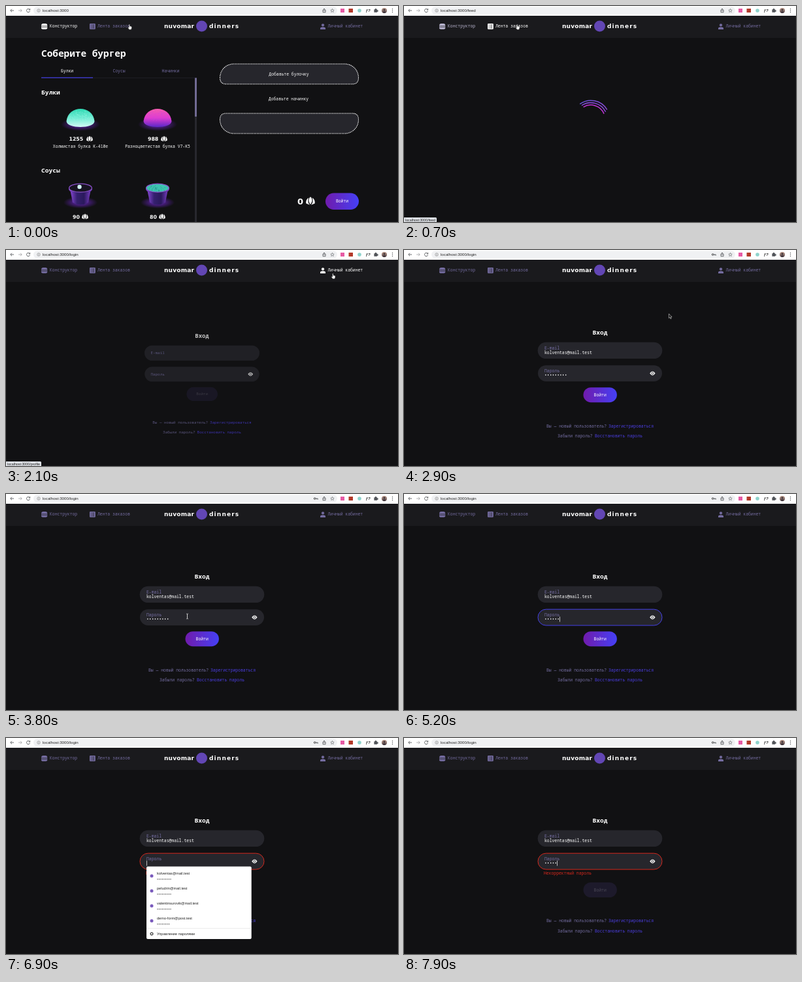
Write an HTML page that moves like this. It is 600x332 px and loops after 8000 ms.

```html
<!DOCTYPE html>
<html lang="ru">
<head>
<meta charset="utf-8">
<title>Конструктор бургеров</title>
<style>
  html, body { margin: 0; width: 100%; height: 100%; overflow: hidden; background: #111113; }
  svg { display: block; width: 600px; height: 332px; }
  text { font: 500 6.4px "Noto Sans Mono", "DejaVu Sans Mono", monospace; fill: #fff; white-space: pre; }
  .ui { font-family: "Liberation Sans", Arial, sans-serif; font-weight: 400; fill: #222; }
  .num { font: bold 7.8px "DejaVu Sans", sans-serif; }
  .brand { font: bold 9px "DejaVu Sans", sans-serif; }
  .mid { text-anchor: middle; }
  .h1 { font-size: 14.4px; font-weight: 600; }
  .h2 { font-size: 9.6px; font-weight: 600; }
  .dim { fill: #746da2; }
  .link { fill: #4b3ee0; }
  .line { fill: none; stroke: #55585c; stroke-width: .9; }
</style>
</head>
<body>
<svg id="stage" viewBox="0 0 600 332"></svg>
<script>
const LOOP = 8000;
const CHAR = 3.84;
const INPUT = '#26262c';

const text = (x, y, str, cls = '', extra = '') =>
  `<text x="${x}" y="${y}" class="${cls}" ${extra}>${str}</text>`;
const rect = (x, y, w, h, fill, r = 0, extra = '') =>
  `<rect x="${x}" y="${y}" width="${w}" height="${h}" rx="${r}" fill="${fill}" ${extra}/>`;
const circle = (x, y, r, fill, extra = '') =>
  `<circle cx="${x}" cy="${y}" r="${r}" fill="${fill}" ${extra}/>`;
const ellipse = (x, y, rx, ry, fill, extra = '') =>
  `<ellipse cx="${x}" cy="${y}" rx="${rx}" ry="${ry}" fill="${fill}" ${extra}/>`;
const path = (d, fill, extra = '') => `<path d="${d}" fill="${fill}" ${extra}/>`;
const line = d => `<path class="line" d="${d}"/>`;
const group = (id, body, extra = '') => `<g id="${id}" ${extra}>${body}</g>`;

let seed = 7;
const random = () => (seed = seed * 16807 % 2147483647) / 2147483647;

function speckles(cx, cy, rx, ry, color, count, arc = Math.PI) {
  let out = '';
  for (let i = 0; i < count; i++) {
    const a = Math.PI + arc * random(), d = Math.sqrt(random());
    const x = cx + Math.cos(a) * rx * d, y = cy + Math.sin(a) * ry * d;
    out += circle(x.toFixed(1), y.toFixed(1), .45, color);
  }
  return out;
}

const gradient = (id, colors, dir = '') => `<linearGradient id="${id}" ${dir}>`
  + colors.map((c, i) => `<stop offset="${i / (colors.length - 1)}" stop-color="${c}"/>`).join('') + '</linearGradient>';
const down = 'x1="0" y1="0" x2="0" y2="1"';

const defs = `<defs>
  ${gradient('action', ['#701bac', '#4540f5'])}
  ${gradient('mint', ['#2fd9b3', '#6fecd3', '#d3faf5'], down)}
  ${gradient('berry', ['#f45cb0', '#e03cd0', '#5a28c8'], down)}
  ${gradient('pot', ['#8a48d8', '#35206f', '#2a195c', '#7a3fc4'])}
  ${gradient('arc', ['#6558d8', '#8a48d6'])}
  ${gradient('face', ['#bd9a8a', '#59494e'], down)}
  <radialGradient id="glow"><stop stop-color="#6b24c5"/><stop offset="1" stop-color="#6b24c5" stop-opacity="0"/></radialGradient>
</defs>`;

const toolbar = rect(0, 0, 600, 15, '#fff') + rect(42, 1.5, 465, 11, '#f0f1f3', 5.5)
  + line('M12 7H7M9 4.7L6.7 7L9 9.3')
  + `<g opacity=".5">${line('M19 7H24M22 4.7L24.3 7L22 9.3')}</g>`
  + line('M36.2 5.5A2.6 2.6 0 1 0 36.6 7.6M36.7 4V6H34.7')
  + `<g opacity=".8">${circle(50, 7, 2.3, 'none', 'stroke="#666" stroke-width=".6"')}${line('M50 6.7V8.2M50 5.4V5.9')}</g>`
  + text(56, 9.2, 'localhost:3000', 'ui', 'id="url" style="font-size:6.2px"')
  + group('key', circle(472.6, 7, 1.3, 'none', 'stroke="#444" stroke-width="1"') + line('M474 7H477.3V8.5M475.7 7V8.3'))
  + line('M486 6H485V9.7H489V6H488M487 8V4M485.8 5.2L487 4L488.2 5.2')
  + path('M499.5 4.3L500.3 6.1L502.2 6.3L500.8 7.6L501.2 9.5L499.5 8.5L497.8 9.5L498.2 7.6L496.8 6.3L498.7 6.1Z', 'none', 'stroke="#55585c" stroke-width=".6"')
  + rect(512, 4, 6, 6, '#e65ba5') + rect(524.5, 4, 6.5, 6, '#b33a2a') + circle(541, 7, 2.8, '#8ed3cc')
  + text(550.5, 9.2, 'ƒ?', 'ui', 'style="font-style:italic;font-weight:bold;font-size:6.2px"')
  + path('M563.4 5.2H565A1.1 1.1 0 1 1 567 5.2H568.2V6.5A1.1 1.1 0 1 1 568.2 8.5V9.8H563.4Z', '#505358')
  + circle(579, 7, 4, 'url(#face)') + circle(579, 6, 1.4, '#40363c') + path('M576.3 9.6Q579 6.3 581.7 9.6Q579 12.2 576.3 9.6', '#40363c')
  + [4.5, 7, 9.5].map(y => circle(591.5, y, .7, '#55585c')).join('');

const header = rect(0, 15, 600, 34, '#1a1a1d')
  + group('navBuild', path('M54 30.4Q54 27 57 27H60.3Q63.3 27 63.3 30.4Z', 'inherit')
      + rect(54, 31.1, 9.3, 1.3, 'inherit') + path('M54 33H63.3V34Q63 35.7 61 35.7H56.3Q54 35.7 54 34Z', 'inherit')
      + text(67, 33.4, 'Конструктор', '', 'style="fill:inherit"'))
  + group('navFeed', rect(128, 27, 8.8, 8.8, 'inherit', 1)
      + path('M129.8 29.2H131M132 29.2H135M129.8 31.4H131M132 31.4H135M129.8 33.6H131M132 33.6H135', 'none', 'stroke="#1a1a1d" stroke-width=".8"')
      + text(140, 33.4, 'Лента заказов', '', 'style="fill:inherit"'))
  + group('navUser', circle(485, 29.3, 2.1, 'inherit') + path('M481 36V34.2Q481 32.2 485 32.2Q489 32.2 489 34.2V36Z', 'inherit')
      + text(492.5, 33.4, 'Личный кабинет', '', 'style="fill:inherit"'))
  + text(242, 33.6, 'nuvomar', 'brand', 'letter-spacing=".2"')
  + circle(299.5, 31, 8.5, '#6246b4')
  + text(311, 33.6, 'dinners', 'brand', 'letter-spacing="1.15"');

const gem = (x, y, s) => `<g transform="translate(${x} ${y}) scale(${s})" fill="#fff">
  <path d="M0-4.6C2.3-2.6 2.6.8 0 4C-2.6.8-2.3-2.6 0-4.6M-2-3.6C-4.2-2.4-5.4.2-4.9 3L-.8 4.6C-3 2.2-3.1-.8-2-3.6M2-3.6C4.2-2.4 5.4.2 4.9 3L.8 4.6C3 2.2 3.1-.8 2-3.6"/></g>`;

const bun = (x, fill, dots) => ellipse(x, 182, 30, 10, 'url(#glow)')
  + path(`M${x - 21.5} 177C${x - 19} 151.5 ${x + 19} 151.5 ${x + 21.5} 177C${x + 21.5} 189 ${x - 21.5} 189 ${x - 21.5} 177Z`, fill)
  + speckles(x, 176, 18, 16, dots, 90);

const pot = (x, sauce) => ellipse(x, 302, 26, 9, 'url(#glow)')
  + path(`M${x - 16} 281L${x - 12} 302Q${x} 309 ${x + 12} 302L${x + 16} 281Z`, 'url(#pot)')
  + ellipse(x, 281, 18, 7.5, 'url(#pot)') + ellipse(x, 279.7, 17.4, 6.5, sauce, 'stroke="#8a50c8" stroke-width="1.2"');

const price = (x, y, value, gemX) => text(x, y, value, 'num') + gem(gemX, y - 3, .95);

const button = (x, y, w, h, id, extra = '') => rect(x, y, w, h, 'url(#action)', h / 2, `id="${id}"`)
  + text(x + w / 2, y + h / 2 + 2.2, 'Войти', 'mid', extra);

const slot = d => path(d, INPUT, 'stroke="#fff" stroke-width="1.1" stroke-dasharray="1.5 1"');

const builder = text(54, 77.8, 'Соберите бургер', 'h1')
  + text(93.5, 101.7, 'Булки', 'mid') + text(173, 101.7, 'Соусы', 'mid dim') + text(252, 101.7, 'Начинки', 'mid dim')
  + rect(54, 110, 235, 1, '#1d1d24') + rect(54, 109.6, 79, 1.2, '#4540e8')
  + rect(289, 110.5, 3, 222, '#28282e') + rect(289, 110.5, 3, 59.5, '#716b94')
  + text(54, 136, 'Булки', 'h2') + text(54, 256, 'Соусы', 'h2')
  + bun(114, 'url(#mint)', '#a4f7e6') + bun(232, 'url(#berry)', '#c44be0')
  + price(96.5, 207, '1255', 128) + price(217, 207, '988', 242)
  + text(114, 218.3, 'Холмистая булка K-410e', 'mid') + text(232, 218.3, 'Разноцветистая булка V7-K5', 'mid')
  + pot(114, '#171421') + circle(112.5, 278, 3.2, '#d2f4f3')
  + pot(232, '#3cc4b0') + speckles(232, 280, 14, 5, '#1f6a70', 35, Math.PI * 2)
  + price(102, 326.5, '90', 121) + price(220, 326.5, '80', 239)
  + slot('M327.5 110.5C327.5 98 337 89 349 89H518C530 89 539.5 98 539.5 110.5Q539.5 120 530 120H337Q327.5 120 327.5 110.5Z')
  + slot('M327.5 174.5Q327.5 165 337 165H530Q539.5 165 539.5 174.5C539.5 187 530 196 518 196H349C337 196 327.5 187 327.5 174.5Z')
  + text(433, 107, 'Добавьте булочку', 'mid') + text(432.5, 145, 'Добавьте начинку', 'mid')
  + text(446, 305, '0', 'num', 'style="font-size:13px"') + gem(466, 299.5, 1.35)
  + button(489, 287.5, 51, 25.5, 'orderBtn');

const spinner = [28.8, 25.3, 21.8].map((r, i) => {
  const point = deg => [286 + r * Math.cos(deg * Math.PI / 180), 174 + r * Math.sin(deg * Math.PI / 180)].map(v => v.toFixed(2));
  return path(`M${point(-126 + i * 2)}A${r} ${r} 0 0 1 ${point(-31 + i * 4)}`, 'none',
    `stroke="${['url(#arc)', '#8348d4', '#c233d6'][i]}" stroke-width="1.5"`);
}).join('');

const login = text(300, 129.6, 'Вход', 'mid h2')
  + rect(204.7, 141.7, 190.6, 25.4, INPUT, 12.7)
  + rect(205, 177.2, 190, 24.8, INPUT, 12.4, 'id="passBox" stroke-width="1"')
  + text(215, 156.7, 'E-mail', 'dim', 'id="mailLabel"') + text(215, 160.2, 'kolventas@mail.test', '', 'id="mail"')
  + text(215, 192, 'Пароль', 'dim', 'id="passLabel"') + text(215, 195, '', '', 'id="dots"')
  + rect(215, 188.5, .7, 8, '#fff', 0, 'id="caret"')
  + path('M376.2 189.6Q380.4 183.4 384.6 189.6Q380.4 195.8 376.2 189.6Z', '#fff')
  + circle(380.4, 189.6, 1.6, 'none', `stroke="${INPUT}" stroke-width=".9"`)
  + text(214, 210.2, 'Некорректный пароль', '', 'id="error" style="fill:#d5281d"')
  + group('lower', button(274.5, 211.2, 51.4, 23, 'loginBtn', 'id="loginText"')
    + text(218, 272.5, 'Вы — новый пользователь?', 'dim') + text(313, 272.5, 'Зарегистрироваться', 'link')
    + text(235, 288.3, 'Забыли пароль?', 'dim') + text(292, 288.3, 'Восстановить пароль', 'link'));

const accounts = [['kolventas@mail.test', 9], ['peludrin@mail.test', 9], ['valentinsurovik@mail.test', 9], ['demo-form@post.test', 8]];
const small = 'style="font-size:5.6px"';
const dropdown = rect(215, 197.5, 160.7, 111.5, '#fff', 2)
  + accounts.map(([mail, n], i) => circle(223, 212 + i * 23, 2.5, '#7a5bbd')
    + text(231, 210 + i * 23, mail, 'ui', small)
    + Array.from({ length: n }, (_, k) => circle(232 + k * 2.5, 217 + i * 23, .7, '#333')).join('')).join('')
  + rect(215, 292.5, 160.7, .6, '#ddd')
  + circle(223, 301, 1.7, 'none', 'stroke="#444" stroke-width="1.1"')
  + circle(223, 301, 2.5, 'none', 'stroke="#444" stroke-width=".8" stroke-dasharray="1 .96"')
  + text(231, 303, 'Управление паролями', 'ui', small);

const outline = 'stroke="#222" stroke-width=".4"';
const cursor = group('hand', path('M-1.3-3.5Q-.6-4.2 0-3.4V-.9Q2.6-1 2.9.2V2.2L2 4.2H-1L-3 1.2Q-2.8.2-1.3 1.2Z', '#fff', outline))
  + group('arrow', path('M-2-4V2.8L-.4 1.4L.7 3.9L1.7 3.4L.6 1H2.7Z', '#111', 'stroke="#fff" stroke-width=".5"'))
  + group('beam', path('M-1.5-4Q0-4 0-3V3Q0 4-1.5 4M1.5-4Q0-4 0-3V3Q0 4 1.5 4', 'none', 'stroke="#ddd" stroke-width=".7"'));

document.getElementById('stage').innerHTML = defs + rect(0, 0, 600, 332, '#111113') + toolbar + header
  + group('builder', builder) + group('spinner', spinner) + group('login', login) + group('dropdown', dropdown)
  + group('status', rect(-2, 325, 52, 9, '#dee1e6', 1.5, 'id="statusBox"') + text(2, 330.5, '', 'ui', 'id="statusText" style="font-size:5.3px"'))
  + group('cursor', cursor);

const el = {};
document.querySelectorAll('[id]').forEach(node => el[node.id] = node);

// [start time, value]
const URLS = [[0, ''], [600, '/feed'], [1900, '/login']];
const STATUS = [[0, ''], [200, 'feed'], [1100, ''], [1500, 'profile'], [2800, '']];
const DOTS = [[0, 0], [2500, 9], [4700, 8], [5000, 7], [5200, 6], [5400, 5], [5500, 4], [5600, 3], [5700, 2], [5900, 1],
  [6100, 0], [7200, 1], [7500, 2], [7600, 3], [7700, 4], [7900, 5]];
// [time, x, y]
const MOVES = [[0, 189.5, 32], [500, 174, 32], [1000, 174, 32], [1700, 501, 40], [2500, 501, 40], [3400, 277.5, 188], [8000, 277.5, 188]];

const stepAt = (steps, t) => steps.reduce((v, [start, value]) => t >= start ? value : v, steps[0][1]);
const ramp = (t, a, b) => Math.min(1, Math.max(0, (t - a) / (b - a)));
const within = (t, a, b) => t >= a && t < b;
const show = (id, on) => el[id].style.display = on ? '' : 'none';
const ease = p => p * p * (3 - 2 * p);

function pointer(t) {
  const i = Math.max(1, MOVES.findIndex(m => m[0] > t));
  const [t0, x0, y0] = MOVES[i - 1], [t1, x1, y1] = MOVES[i];
  const p = ease(ramp(t, t0, t1));
  return [x0 + (x1 - x0) * p, y0 + (y1 - y0) * p];
}

function tint(id, p) {
  const c = [116, 108, 160].map(v => Math.round(v + (255 - v) * p));
  el[id].style.fill = `rgb(${c})`;
}

function render(t) {
  el.url.textContent = 'localhost:3000' + stepAt(URLS, t);
  const status = stepAt(STATUS, t);
  show('status', status);
  el.statusText.textContent = 'localhost:3000/' + status;
  el.statusBox.setAttribute('width', status === 'feed' ? 52 : 56);

  tint('navBuild', 1 - ramp(t, 550, 850));
  tint('navFeed', ramp(t, 500, 700) - ramp(t, 1850, 2050));
  tint('navUser', ramp(t, 1650, 1900) - ramp(t, 2550, 2800));

  show('builder', t < 600);
  show('spinner', within(t, 600, 1900));
  el.spinner.setAttribute('transform', `rotate(${(t - 700) * .36} 286 174)`);

  const enter = ramp(t, 1900, 2170), scale = .7 + .3 * enter;
  show('login', t >= 1900);
  el.login.setAttribute('opacity', enter);
  el.login.setAttribute('transform', `translate(300 206) scale(${scale}) translate(-300 -206)`);

  const filled = t >= 2500, focused = t >= 4100, invalid = t >= 5400;
  const count = stepAt(DOTS, t);
  show('key', filled);
  show('mail', filled);
  el.mailLabel.setAttribute('y', filled ? 152.8 : 156.7);
  el.passLabel.setAttribute('y', filled ? 187.7 : 192);
  el.dots.textContent = '•'.repeat(count);
  el.caret.setAttribute('x', 215 + count * CHAR);
  show('caret', focused && !within(t, 6500, 6900));
  el.passBox.setAttribute('stroke', invalid ? '#d5281d' : focused ? '#4540e8' : 'none');
  show('error', invalid);
  el.lower.setAttribute('transform', `translate(0 ${invalid ? 10.8 : 0})`);
  const ready = filled && !invalid;
  el.loginBtn.setAttribute('fill', ready ? 'url(#action)' : '#1d1a2b');
  el.loginText.style.fill = ready ? '#fff' : '#4b4956';
  show('dropdown', within(t, 4100, 4600) || within(t, 6300, 7200));

  const [x, y] = pointer(t);
  const overField = within(x, 205, 395) && within(y, 177, 202);
  const overLink = within(y, 24, 44) && (within(x, 127, 191) || within(x, 480, 547));
  show('cursor', t < 4400);
  el.cursor.setAttribute('transform', `translate(${x} ${y})`);
  show('beam', overField);
  show('hand', overLink);
  show('arrow', !overField && !overLink);
}

function frame() {
  render(performance.now() % LOOP);
  requestAnimationFrame(frame);
}
frame();
</script>
</body>
</html>
```
